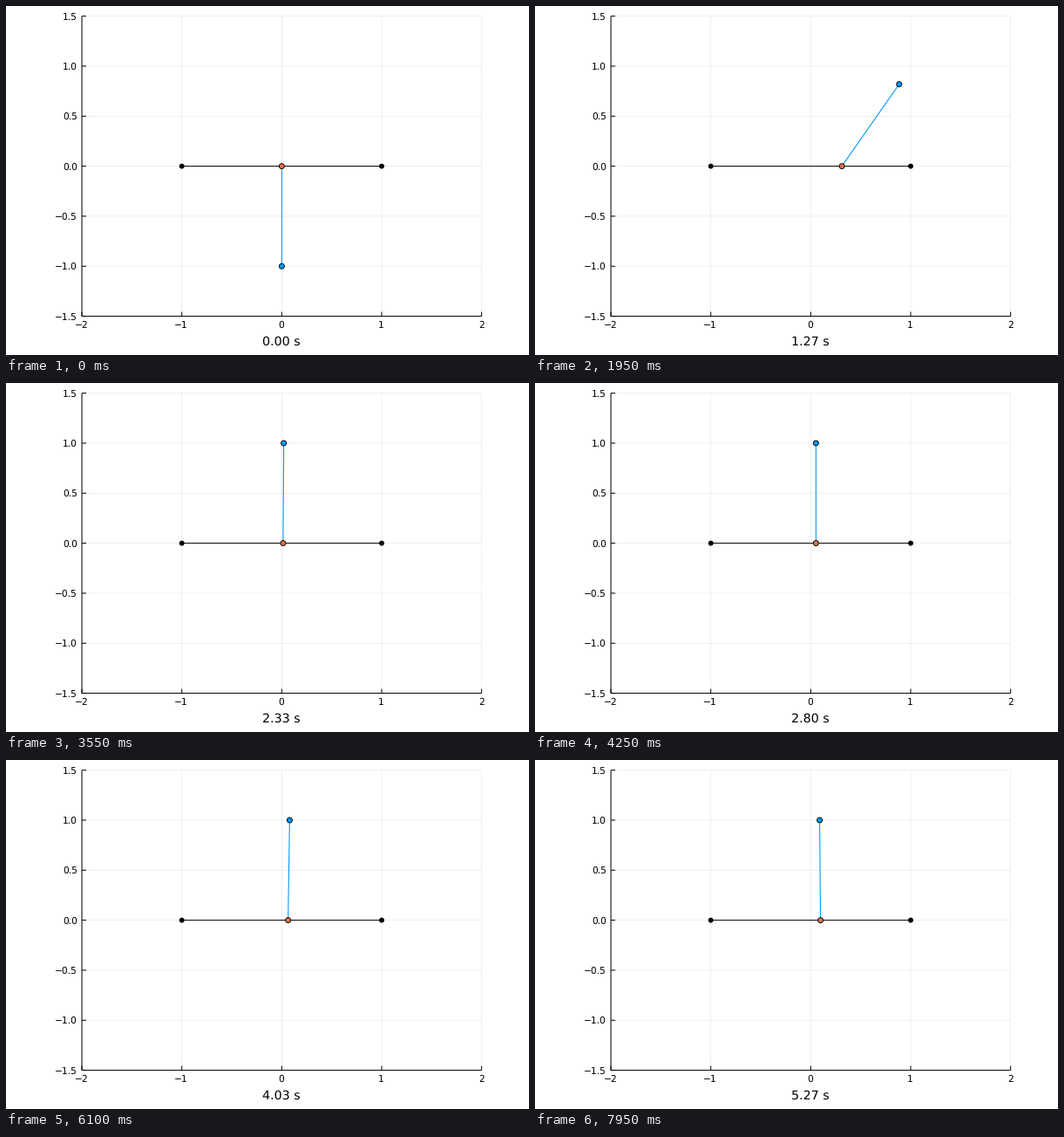
Write a matplotlib script that moves like this. It is 600 px wide and 400 px high and loops after 8 s.

```python
import numpy as np
import matplotlib as mpl
import matplotlib.pyplot as plt
from matplotlib.animation import FuncAnimation
from matplotlib.patches import Circle

W, H, DPI = 600, 400, 100
FRAMES, INTERVAL, RATE = 160, 50, 30
X0, Y0, UNIT = 316.35, 183.6, 114.65
PT = 72 / DPI  # points per pixel
BLUE, ORANGE = "#009AFA", "#E26F46"

mpl.rcParams["font.family"] = "DejaVu Sans"
mpl.rcParams["text.hinting"] = "none"

# swing-up: time, cart position, pole angle from hanging (counterclockwise)
SWING = np.array([
    (0.000, 0.000, 0.000), (0.200, 0.200, -0.200), (0.500, 0.670, -0.660),
    (0.700, 0.760, -0.100), (0.900, 0.715, 1.030), (1.100, 0.527, 2.042),
    (1.267, 0.311, 2.532), (1.667, -0.023, 2.892), (1.867, -0.017, 3.025),
    (2.800, 0.052, np.pi),
])
TIMES, STATES = SWING[:, 0], SWING[:, 1:]
SLOPES = np.gradient(STATES, TIMES, axis=0)
SLOPES[0] = 0


def state(t):
    """Cart position and pole angle: smooth swing-up, then slow balancing."""
    s = t - TIMES[-1]
    if s > 0:
        return STATES[-1] + (0.0075 * s * s, -0.016 * np.sin(1.5 * s))
    i = max(np.searchsorted(TIMES, t) - 1, 0)
    h = TIMES[i + 1] - TIMES[i]
    u = (t - TIMES[i]) / h
    a, b = STATES[i], STATES[i + 1]
    return (a + (b - a) * u * u * (3 - 2 * u)
            + h * u * (1 - u) * (SLOPES[i] * (1 - u) - SLOPES[i + 1] * u))


def px(x):
    return X0 + UNIT * x


def py(y):
    return Y0 - UNIT * y


LEFT, RIGHT, TOP, BOTTOM = px(-2), px(2), py(1.5), py(-1.5)

fig = plt.figure(figsize=(W / DPI, H / DPI), dpi=DPI, facecolor="white")
ax = fig.add_axes([0, 0, 1, 1])
ax.set_xlim(0, W)
ax.set_ylim(H, 0)
ax.axis("off")


def stroke(xs, ys, color="black", width=1.0, z=2, alpha=1):
    return ax.plot(xs, ys, color=color, lw=width * PT, alpha=alpha, zorder=z,
                   snap=False, solid_capstyle="butt")[0]


def grid(xs, ys):
    stroke(xs, ys, width=0.6, z=1, alpha=0.1)


def dot(x, color, radius, z):
    return ax.add_patch(Circle((x, Y0), radius, fc=color, ec="black",
                               lw=0.9 * PT, zorder=z))


def label(x, y, text, size, ha):
    return ax.text(x, y, text, fontsize=size * PT, ha=ha, va="baseline")


def number(v, digits):
    return f"{v:.{digits}f}".replace("-", "\u2212")


for v in range(-2, 3):
    x = px(v)
    grid([x, x], [TOP, BOTTOM])
    stroke([x, x], [BOTTOM, BOTTOM - 5])
    label(x - 0.5, 369, number(v, 0), 10.67, "center")

for v in np.arange(-1.5, 1.6, 0.5):
    y = py(v)
    grid([LEFT, RIGHT], [y, y])
    stroke([LEFT, LEFT + 5], [y, y])
    label(82, y + 4, number(v, 1), 10.67, "right")

stroke([LEFT, LEFT], [TOP, BOTTOM])
stroke([LEFT, RIGHT], [BOTTOM, BOTTOM])

stroke([px(-1), px(1)], [Y0, Y0], z=3)
for end in (-1, 1):
    dot(px(end), "black", 2.5, 4)

pole = stroke([], [], BLUE, 1.1, z=5)
cart = dot(X0, ORANGE, 3, 6)
bob = dot(X0, BLUE, 3, 7)
clock = label(X0 - 0.5, 389, "", 14.3, "center")


def update(n):
    t = max(n - 1, 0) / RATE
    pos, angle = state(t)
    x, bx, by = px(pos), px(pos + np.sin(angle)), py(-np.cos(angle))
    pole.set_data([x, bx], [Y0, by])
    cart.center = x, Y0
    bob.center = bx, by
    clock.set_text(f"{t:.2f} s")
    return pole, cart, bob, clock


anim = FuncAnimation(fig, update, frames=FRAMES, interval=INTERVAL,
                     repeat=True, repeat_delay=0)
plt.show()
```
